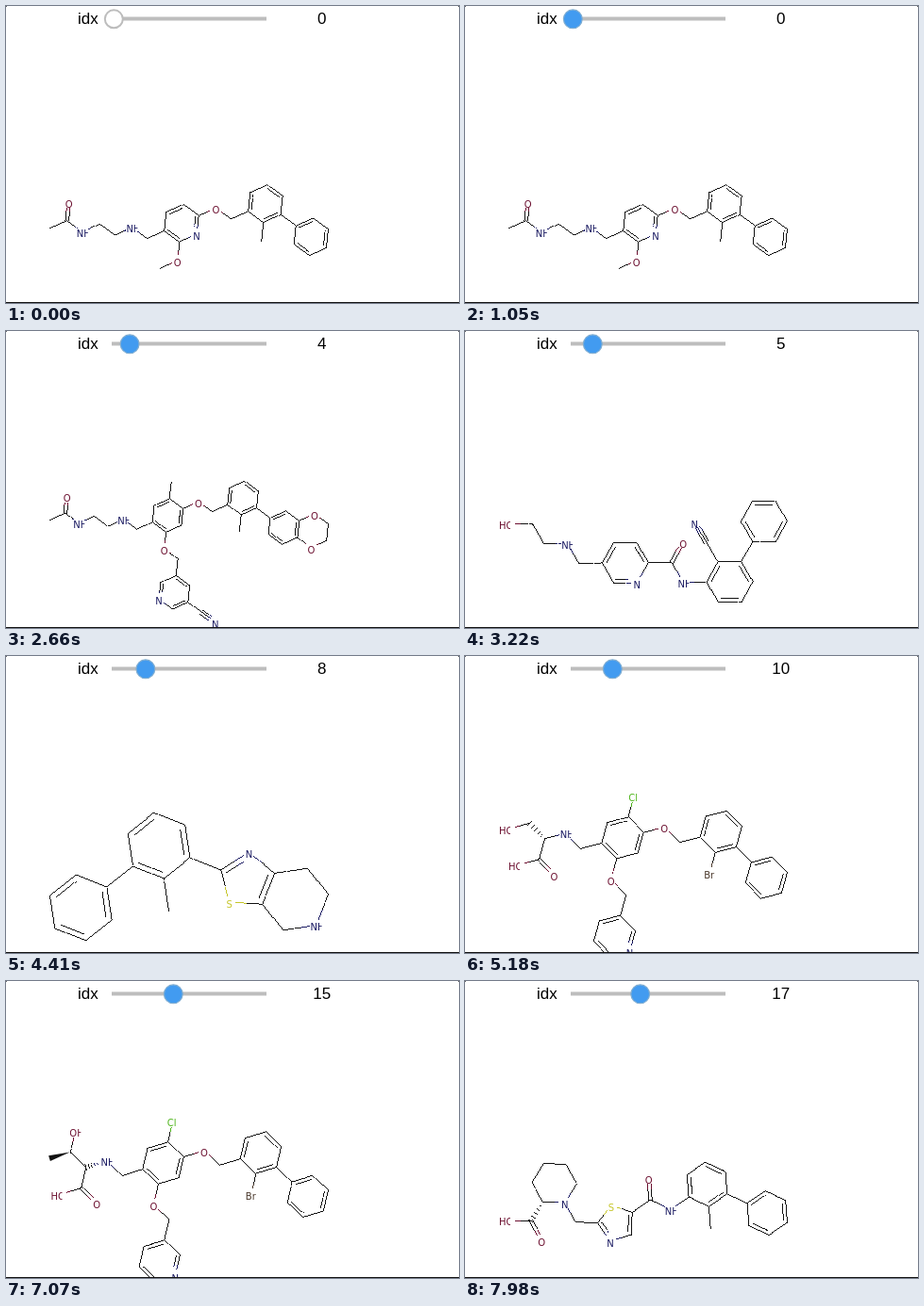
An HTML page with a canvas that plays this animation: 480x315 px, repeating every 8000 ms.

```html
<!DOCTYPE html>
<html lang="en">
<head>
<meta charset="utf-8">
<title>Molecule slider</title>
<style>
html, body { margin: 0; width: 100%; height: 100%; overflow: hidden; background: #fff; }
canvas { display: block; }
</style>
</head>
<body>
<canvas id="stage" width="480" height="315"></canvas>
<script>
const ctx = document.getElementById('stage').getContext('2d');
const LOOP = 8000;
const COLORS = { C: '#111', N: '#1a1a62', O: '#6c1030', S: '#c6c62a', Cl: '#4fb51c', Br: '#4a382b' };

/* Structure notation, drawn by a turtle:
   f l r       one bond straight, 60° left, 60° right (.X labels the new atom)
   = # h w     prefix: double, triple, hashed, wedge
   6/024/4N    ring size / double bonds / labelled corners
   2&6/...     ring fused to edge 2 of the current ring
   3( ... )    branch pointing outward from corner 3 */
const TOKEN = /(?:\d&)?\d\/\d*(?:\/[\w,]+)?|\d\(|[()]|[=#hw]?[flr](?:\.[A-Za-z]+)?/g;

const phenyl = '6/024';
const dioxane = '6/024 2&6//2O,5O';
const nitrile = ' #f.N';
const cyanoPyridine = '6/024/4N 2(f #f.N)';
const pyridine = '6/135/2N';
const biaryl = (sub, end = phenyl) => `6/024 5(f${sub}) 4(f ${end})`;
const ether = (sub, end) => `3(f.O r l ${biaryl(sub, end)})`;
const acetamide = '0(f r.NH l r l.NH r (=r.O) l)';
const ethanolamine = '0(f r.NH l r l.OH)';
const acid = '(r.OH) (=l.O)';
const serine = `0(f r.NH l (hr l.OH) (l ${acid}))`;
const threonine = `0(f r.NH hl (r (r.OH) (wl)) (l ${acid}))`;
const pipecolic = `0(f r 6//0N 1(hf ${acid}))`;
const bicycle = tail => `5/02/1N,4S 0(f 6/135 1(f) 2(f ${phenyl})) ${tail}`;
const picolinamide = (amine, end) =>
  `6/024/4N ${amine} 3(f (=l.O) r.NH l 6/024 1(f #f.N) 2(f ${end}))`;

// Starting direction in degrees, then the structure
const MOLECULES = [
  [-24, `6/135/4N ${acetamide} 5(f.O r) ${ether('')}`],
  [-33.7, `6/135 ${acetamide} 1(f.O r l ${cyanoPyridine}) 4(f) ${ether(nitrile, dioxane)}`],
  [-22, `6/135 ${ethanolamine} 5(f.O l r ${cyanoPyridine}) 2(f) ${ether(nitrile, dioxane)}`],
  [-24, `6/135 ${acetamide} 5(f.O l r ${cyanoPyridine}) 2(f) ${ether('', dioxane)}`],
  [-27, `6/135/4N ${acetamide} 5(f.O r) ${ether(nitrile, dioxane)}`],
  [-0.5, picolinamide(ethanolamine, phenyl)],
  [4, picolinamide('0(f r.NH l r)', dioxane)],
  [14, bicycle('2&6//3NH')],
  [21.5, bicycle('2&6//4NH')],
  [24, bicycle('2&6//4N 4(f)')],
  [-14.5, `6/135 ${serine} 2(f.Cl) ${ether('.Br')} 5(f.O l r ${pyridine})`],
  [-18, `6/135 ${acetamide} 2(f.Cl) ${ether('.Br', dioxane)} 5(f.O l r ${pyridine})`],
  [-20, `6/135 ${acetamide} 2(f.Cl) ${ether('.Br')} 5(f.O l r 3/)`],
  [-19, `6/135 ${threonine} 2(f.Cl) ${ether('.Br')} 5(f.O l r 3/)`],
  [-17, `6/135 ${threonine} 2(f.Cl) ${ether('.Br')} 5(f.O l r ${pyridine})`],
  [-18, `6/135 ${threonine} 2(f.Cl) ${ether('')} 5(f.O l r ${cyanoPyridine})`],
  [-22, `6/135/4N ${pipecolic} 5(f.O r) ${ether('')}`],
  [1.5, `5/24/1S,4N ${pipecolic} 2(f (=l.O) r.NH l ${biaryl('')})`]
].map(([dir, src]) => fit(build(dir, src)));

const STARTS = [0, 1610, 1960, 2380, 2660, 3150, 3500, 3990, 4410,
  4760, 5180, 5530, 5950, 6300, 6720, 7070, 7490, 7840];
const INSTANT = [0, 3, 8, 10, 13, 14];
const SWAPS = STARTS.map((t, i) => INSTANT.includes(i) ? t : t + 70);

function build(dir, src) {
  const atoms = [{ x: 0, y: 0, label: '' }], bonds = [], stack = [];
  let at = 0, ring = null;

  const step = (from, deg, label = '') => {
    const a = deg * Math.PI / 180;
    atoms.push({ x: atoms[from].x + Math.cos(a), y: atoms[from].y + Math.sin(a), label });
    return atoms.length - 1;
  };
  const heading = (p, q) => Math.atan2(q.y - p.y, q.x - p.x) * 180 / Math.PI;

  function addRing(token) {
    const [head, doubles, labels] = token.split('/');
    const n = +head.slice(-1), fused = head.includes('&');
    let ids = [at], first = dir - 90 + 180 / n;
    if (fused) {
      const k = +head[0];
      ids = [ring.ids[(k + 1) % ring.ids.length], ring.ids[k]];
      first = heading(atoms[ids[0]], atoms[ids[1]]);
    }
    for (let j = ids.length; j < n; j++) ids.push(step(ids[j - 1], first + (j - 1) * 360 / n));
    if (labels) labels.split(',').forEach(s => { atoms[ids[s[0]]].label = s.slice(1); });
    const center = { x: 0, y: 0 };
    ids.forEach(i => { center.x += atoms[i].x / n; center.y += atoms[i].y / n; });
    for (let j = fused ? 1 : 0; j < n; j++) {
      const kind = doubles.includes(j) ? 'inner' : '';
      bonds.push({ a: ids[j], b: ids[(j + 1) % n], kind, center });
    }
    ring = { ids, center };
  }

  for (const token of src.match(TOKEN)) {
    if (token === ')') {
      ({ at, dir, ring } = stack.pop());
    } else if (token.endsWith('(')) {
      stack.push({ at, dir, ring });
      if (token.length > 1) {
        at = ring.ids[token[0]];
        dir = heading(ring.center, atoms[at]);
      }
    } else if (token.includes('/')) {
      addRing(token);
    } else {
      const [move, label] = token.split('.');
      dir += { f: 0, l: -60, r: 60 }[move.slice(-1)];
      const next = step(at, dir, label);
      bonds.push({ a: at, b: next, kind: move.slice(0, -1) });
      at = next;
    }
  }
  return { atoms, bonds };
}

// Scale to the drawing width and centre vertically
function fit({ atoms, bonds }) {
  const xs = atoms.map(p => p.x), ys = atoms.map(p => p.y);
  const left = Math.min(...xs), scale = 295 / (Math.max(...xs) - left);
  const midY = (Math.min(...ys) + Math.max(...ys)) / 2;
  const place = p => ({ ...p, x: 46 + (p.x - left) * scale, y: 233.5 + (p.y - midY) * scale });
  return {
    scale,
    atoms: atoms.map(place),
    bonds: bonds.map(b => b.center ? { ...b, center: place(b.center) } : b)
  };
}

const element = p => p.label.replace('H', '') || 'C';
const mix = (p, q, k) => ({ x: p.x + (q.x - p.x) * k, y: p.y + (q.y - p.y) * k });
const shift = (p, v, k) => ({ x: p.x + v.x * k, y: p.y + v.y * k });

// One-pixel line without smoothing
function line(p, q, color) {
  ctx.fillStyle = color;
  const n = Math.max(1, Math.round(Math.max(Math.abs(q.x - p.x), Math.abs(q.y - p.y))));
  for (let i = 0; i <= n; i++) {
    const c = mix(p, q, i / n);
    ctx.fillRect(Math.round(c.x), Math.round(c.y), 1, 1);
  }
}

function drawBond(bond, atoms, scale) {
  const a = atoms[bond.a], b = atoms[bond.b];
  const len = Math.hypot(b.x - a.x, b.y - a.y);
  const gap = atom => atom.label ? 7 / len : 0;
  const p = mix(a, b, gap(a)), q = mix(b, a, gap(b)), mid = mix(a, b, 0.5);
  const normal = { x: (a.y - b.y) / len, y: (b.x - a.x) / len };
  const ca = COLORS[element(a)], cb = COLORS[element(b)];
  const stroke = (off, trim = 0) => {
    const m = shift(mid, normal, off);
    line(shift(mix(p, q, trim), normal, off), m, ca);
    line(m, shift(mix(q, p, trim), normal, off), cb);
  };

  if (bond.kind === 'h') {
    for (let i = 1; i <= 5; i++) {
      const c = mix(p, q, i / 5), w = 0.3 + i * 0.5;
      line(shift(c, normal, -w), shift(c, normal, w), i < 3 ? ca : cb);
    }
  } else if (bond.kind === 'w') {
    const u = shift(q, normal, 3), v = shift(q, normal, -3);
    ctx.fillStyle = COLORS.C;
    ctx.beginPath();
    ctx.moveTo(p.x, p.y);
    ctx.lineTo(u.x, u.y);
    ctx.lineTo(v.x, v.y);
    ctx.fill();
  } else if (bond.kind === '=') {
    stroke(-1.8);
    stroke(1.8);
  } else {
    stroke(0);
    if (bond.kind === '#') {
      stroke(-2.6);
      stroke(2.6);
    } else if (bond.kind === 'inner') {
      const side = (bond.center.x - mid.x) * normal.x + (bond.center.y - mid.y) * normal.y;
      stroke(Math.sign(side) * scale * 0.16, 0.13);
    }
  }
}

// Two-letter labels are cut off at the edge of a narrow box
function drawLabel(atom, neighbour) {
  const { x, y, label } = atom;
  const flipped = label === 'OH' && neighbour.x > x + 8;
  const text = flipped ? 'HO' : label;
  ctx.fillStyle = COLORS[element(atom)];
  if (text.length === 1) {
    ctx.textAlign = 'center';
    ctx.fillText(text, x + 0.5, y + 6.5);
    return;
  }
  const left = x - (flipped ? 10 : 5.5);
  ctx.save();
  ctx.beginPath();
  ctx.rect(left, y - 6, 12, 18);
  ctx.clip();
  ctx.textAlign = 'left';
  ctx.fillText(text, left, y + 6);
  ctx.restore();
}

function drawMolecule({ atoms, bonds, scale }) {
  bonds.forEach(b => drawBond(b, atoms, scale));
  ctx.font = '10px "DejaVu Sans", sans-serif';
  atoms.forEach((atom, i) => {
    if (!atom.label) return;
    const bond = bonds.find(b => b.a === i || b.b === i);
    drawLabel(atom, atoms[bond.a === i ? bond.b : bond.a]);
  });
}

function drawSlider(idx, active) {
  ctx.fillStyle = '#000';
  ctx.font = '17px "Liberation Sans", Arial, sans-serif';
  ctx.textAlign = 'left';
  ctx.fillText('idx', 76, 19);
  ctx.textAlign = 'center';
  ctx.fillText(idx, 334.8, 19);

  ctx.fillStyle = '#bdbdbd';
  ctx.fillRect(112, 11.5, 164, 4);
  ctx.beginPath();
  ctx.arc(114.3 + idx * 4.2, 13.8, active ? 9.9 : 9.5, 0, Math.PI * 2);
  ctx.fillStyle = active ? '#429bf0' : '#fff';
  ctx.fill();
  ctx.lineWidth = active ? 1.2 : 2;
  ctx.strokeStyle = active ? '#7fadd2' : '#bdbdbd';
  ctx.stroke();
}

const current = (times, t) => times.filter(s => s <= t).length - 1;

function draw(t) {
  ctx.fillStyle = '#fff';
  ctx.fillRect(0, 0, 480, 315);
  drawMolecule(MOLECULES[current(SWAPS, t)]);
  drawSlider(current(STARTS, t), t >= 770);
  ctx.fillStyle = '#111';
  ctx.fillRect(0, 314, 480, 1);
  ctx.fillStyle = '#666';
  ctx.fillRect(0, 0, 1, 1);
  ctx.fillRect(479, 0, 1, 1);
}

const begin = performance.now();
function tick() {
  draw((performance.now() - begin) % LOOP);
  requestAnimationFrame(tick);
}
tick();
</script>
</body>
</html>
```
